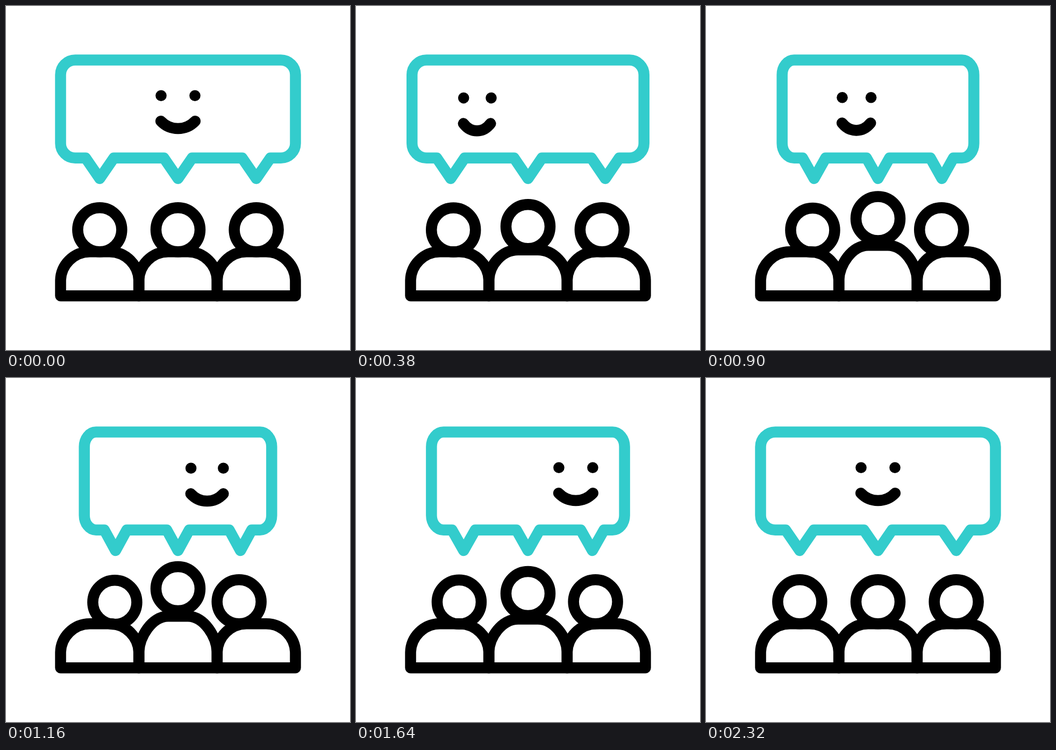
Animation, 640 px wide and 640 px high, one loop 2400 ms. Source, as an HTML page:

```html
<!DOCTYPE html>
<html lang="en">
<head>
<meta charset="utf-8">
<title>Group chat</title>
<style>
  html, body { margin: 0; width: 100%; height: 100%; overflow: hidden; background: #fff; }
  svg { display: block; width: 100vw; height: 100vh; }
  .line { fill: none; stroke: #000; stroke-width: 20.5; stroke-linecap: round; stroke-linejoin: round; }
  #bubble { stroke: #33cccc; }
</style>
</head>
<body>
<svg viewBox="0 0 640 640">
  <path id="bubble" class="line"/>
  <circle id="eyeL" r="10.3"/>
  <circle id="eyeR" r="10.3"/>
  <path id="mouth" class="line"/>
  <path id="bodyL" class="line"/>
  <path id="bodyM" class="line"/>
  <path id="bodyR" class="line"/>
  <circle id="headL" class="line" r="41"/>
  <circle id="headM" class="line" r="41"/>
  <circle id="headR" class="line" r="41"/>
</svg>
<script>
const LOOP = 2400, MID = 320, STEP = 145.65, K = 0.5523;
const el = id => document.getElementById(id);

// Symmetric cubic-bezier(p, 0, 1 - p, 1), solved by bisection.
function ease(x, p) {
  if (x <= 0) return 0;
  if (x >= 1) return 1;
  let lo = 0, hi = 1, s = 0.5;
  for (let i = 0; i < 30; i++) {
    s = (lo + hi) / 2;
    const r = 1 - s;
    if (3 * p * s * r * r + 3 * (1 - p) * s * s * r + s ** 3 < x) lo = s; else hi = s;
  }
  return s * s * (3 - 2 * s);
}

// keys: [time, value] pairs; p: easing strength of each segment
function track(t, keys, p = 1 / 3) {
  if (t <= keys[0][0]) return keys[0][1];
  for (let i = 1; i < keys.length; i++) {
    const [t0, a] = keys[i - 1], [t1, b] = keys[i];
    if (t < t1) return a + (b - a) * ease((t - t0) / (t1 - t0), p);
  }
  return keys[keys.length - 1][1];
}

const LEAN = [[0, 0], [1183, 1], [2285, 0]];
const SQUEEZE = [[60, 0], [1284, 44.5], [2326, 0]];
const FACE_X = [[0, 320], [548, 199], [1392, 413.7], [1560, 413.7], [2152, 320]];
const NARROW = [[0, 0], [548, 1], [1392, 0]];

function bubblePath(shrink) {
  const k = 1 - shrink / 218.5;
  const X = v => (MID + v * k).toFixed(2);
  const w = 218.5, r = 27.3, c = r * (1 - K), top = 100.6, bot = 282.7;
  let d = `M${X(r - w)} ${top}H${X(w - r)}C${X(w - c)} ${top} ${X(w)} ${top + c} ${X(w)} ${top + r}` +
    `V${bot - r}C${X(w)} ${bot - c} ${X(w - c)} ${bot} ${X(w - r)} ${bot}`;
  for (const n of [1, 0, -1]) {
    const x = n * STEP;
    d += `H${X(x + 26.3)}L${X(x)} 321L${X(x - 26.3)} ${bot}`;
  }
  return d + `H${X(r - w)}C${X(c - w)} ${bot} ${X(-w)} ${bot - c} ${X(-w)} ${bot - r}` +
    `V${top + r}C${X(-w)} ${top + c} ${X(c - w)} ${top} ${X(r - w)} ${top}Z`;
}

function bodyPath(cx, lift) {
  const l = cx - STEP / 2, r = cx + STEP / 2, R = 54.6, c = R * (1 - K);
  const y = 511.9, top = 457.2 - lift;
  return `M${l} 539.3V${y}C${l} ${y - R * K} ${l + c} ${top} ${l + R} ${top}` +
    `H${r - R}C${r - c} ${top} ${r} ${y - R * K} ${r} ${y}V539.3Z`;
}

function place(id, x, y) {
  el(id).setAttribute('cx', x);
  el(id).setAttribute('cy', y);
}

function drawFace(t) {
  const x = track(t, FACE_X), n = track(t, NARROW);
  const eye = 31.5 - 7.55 * n, y = 166.8 + 5.5 * n;
  place('eyeL', x - eye, y);
  place('eyeR', x + eye, y);
  const m = 31.9 - 8.6 * n, mx = x - n, my = y + 47.5;
  el('mouth').setAttribute('d',
    `M${mx - m} ${my}C${mx - m * 0.455} ${my + 18.3} ${mx + m * 0.455} ${my + 18.3} ${mx + m} ${my}`);
}

function draw(t) {
  const lean = track(t, LEAN);
  el('bubble').setAttribute('d', bubblePath(track(t, SQUEEZE, 0.75)));
  el('bodyM').setAttribute('d', bodyPath(MID, 14 * lean));
  place('headL', MID - STEP + 28.1 * lean, 416.2 + lean);
  place('headM', MID, 416.2 - 24.2 * lean);
  place('headR', MID + STEP - 32 * lean, 416.2);
  drawFace(t);
}

el('bodyL').setAttribute('d', bodyPath(MID - STEP, 0));
el('bodyR').setAttribute('d', bodyPath(MID + STEP, 0));

const start = performance.now();
function tick() {
  draw((performance.now() - start) % LOOP);
  requestAnimationFrame(tick);
}
draw(0);
requestAnimationFrame(tick);
</script>
</body>
</html>
```
